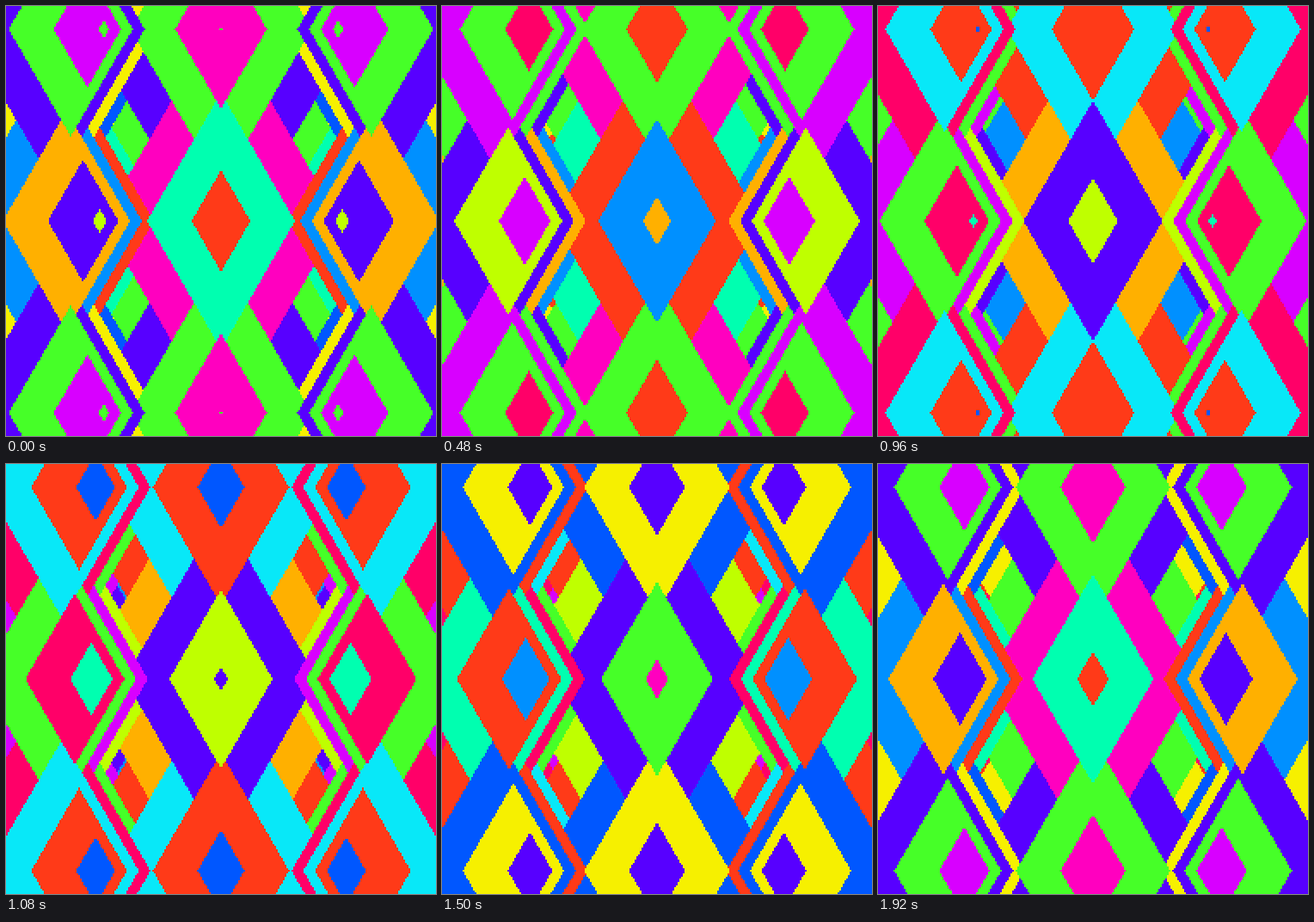
An HTML page with a canvas for the animation above (1.98 s loop, 500x500 px).

```html
<!DOCTYPE html>
<html lang="en">
<head>
<meta charset="utf-8">
<title>Growing diamonds</title>
<style>
  html, body { margin: 0; width: 100%; height: 100%; overflow: hidden; background: #46ff28; }
  canvas { display: block; width: 100vw; height: 100vh; image-rendering: pixelated; }
</style>
</head>
<body>
<canvas id="stage" width="250" height="250"></canvas>
<script>
const SIZE = 250, HALF = SIZE / 2, CELL = 2;
const STEP = 60, STEPS = 33, SLOPE = 1.732;

const hues = {
  red: '#ff3a18', teal: '#00ffb0', pink: '#ff00bf', green: '#46ff28',
  violet: '#5700ff', lime: '#bfff00', orange: '#ffb000', sky: '#0090ff',
  yellow: '#f6f000', blue: '#0057ff', cyan: '#08e8f8', magenta: '#d800ff',
  rose: '#ff0068'
};

// x, y: birthplace; grow: radius per band; drift: sideways shift per radius;
// age: age of the first band at the start; lift: how far it is raised in the stack
const sources = [
  { x: 250, y: 250, grow: 52, drift: 0, age: 0.656, lift: 0,
    bands: 'red teal pink green violet lime violet orange sky' },
  { x: 250, y: 27, grow: 52, drift: 0, age: 1.025, lift: 0,
    bands: 'pink green violet yellow blue red cyan red green' },
  { x: 113.7, y: 250, grow: 33, drift: 0.585, age: 0.245, lift: 1.9,
    bands: 'lime violet orange sky red teal rose green magenta' },
  { x: 117.5, y: 27, grow: 33, drift: 0.585, age: 0.185, lift: 1.9,
    bands: 'green magenta green violet yellow blue red cyan rose' }
];

function pack(hex) {
  const n = parseInt(hex.slice(1), 16);
  return (255 << 24 | (n & 255) << 16 | (n & 0xff00) | n >> 16) >>> 0;
}

for (const s of sources) s.colors = s.bands.split(' ').map(name => pack(hues[name]));

const ctx = document.getElementById('stage').getContext('2d');
const image = ctx.createImageData(SIZE, SIZE);
const pixels = new Uint32Array(image.data.buffer);

// Bands released so far: a slow start that settles into an even pace
function progress(n) {
  const rest = Math.max(0, 1 - n / 13);
  return 0.3 * n - 0.9 * (1 - rest ** 1.8);
}

function diamonds(q) {
  const list = [];
  for (const s of sources) {
    const first = Math.ceil(-q - s.age);
    for (let j = first; j < first + 11; j++) {
      const age = q + s.age + j, r = age * s.grow;
      list.push({
        x: s.x - s.drift * r, y: s.y, r,
        key: age - s.lift,
        color: s.colors[((j % 9) + 9) % 9]
      });
    }
  }
  return list.sort((a, b) => a.key - b.key);
}

function draw(n) {
  const list = diamonds(progress(n));
  const last = list[list.length - 1];
  for (let j = 0; j < HALF; j++) {
    const y = (j + 0.5) * CELL;
    const top = j * SIZE, bottom = (SIZE - 1 - j) * SIZE;
    for (let i = 0; i < HALF; i++) {
      const x = (i + 0.5) * CELL, k = SIZE - 1 - i;
      const hit = list.find(d => Math.abs(x - d.x) + Math.abs(y - d.y) / SLOPE < d.r) || last;
      pixels[top + i] = pixels[top + k] = pixels[bottom + i] = pixels[bottom + k] = hit.color;
    }
  }
  ctx.putImageData(image, 0, 0);
}

const start = performance.now();
let shown = -1;

function tick() {
  const n = Math.floor((performance.now() - start) / STEP) % STEPS;
  if (n !== shown) draw(shown = n);
  requestAnimationFrame(tick);
}
tick();
</script>
</body>
</html>
```
